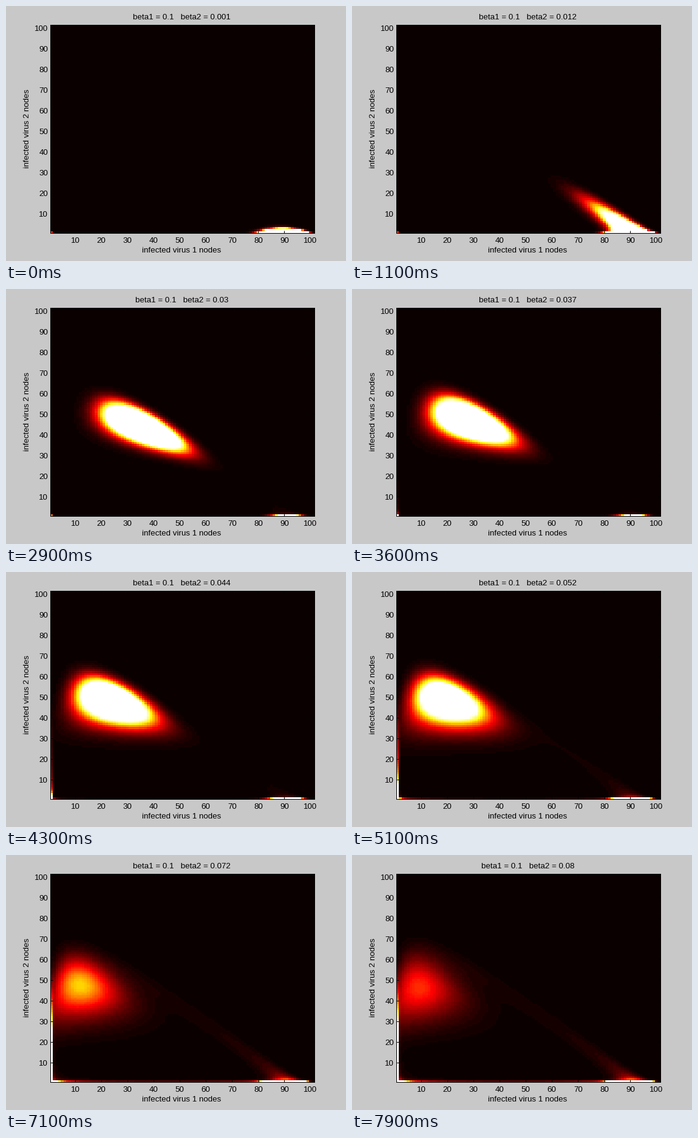
These frames come from a looping animation (560x420 px, 8000 ms). A matplotlib script:

```python
import numpy as np
import matplotlib.pyplot as plt
from matplotlib.animation import FuncAnimation

# Two viruses on N nodes: virus 1 infects healthy nodes, virus 2 only infects
# nodes that carry virus 1. The picture is the state distribution at time T.
W, H = 560, 420
N, TOP = 100, 80              # nodes, highest virus 2 level kept
BETA1, SEED = 0.1, 0.085      # infection rate, rate of spontaneous infection
T, STEPS = 100, 10
PEAK = 0.001                  # density shown as white
FRAMES, INTERVAL = 80, 100
STEP = (1 - 0.5 ** 0.5) * T / STEPS


def factor(beta2):
    """Eliminate the levels of I - STEP * Q from the top down."""
    inv, up = [None] * (TOP + 1), [None] * (TOP + 1)
    for y in range(TOP, -1, -1):
        x = np.arange(N + 1 - y)
        free = x[::-1]
        birth = (BETA1 * x * free + SEED) * (free > 0)
        turn = (beta2 * x * y + SEED) * (x > 0) * (y < TOP)
        m = np.diag(1 + STEP * (birth + x + y + turn))
        m -= np.diag(STEP * birth[:-1], 1) + np.diag(STEP * x[1:], -1)
        up[y] = STEP * turn[1:]
        if y < TOP:
            m[1:, :-1] -= STEP * (y + 1) * up[y][:, None] * inv[y + 1]
        inv[y] = np.linalg.inv(m)
    return inv, up


def solve(rhs, inv, up):
    p = [None] * (TOP + 1)
    for y in range(TOP, -1, -1):
        v = rhs[y, :N + 1 - y].copy()
        if y < TOP:
            v[:-1] += STEP * (y + 1) * p[y + 1]
        p[y] = v @ inv[y]
    out = np.zeros_like(rhs)
    for y in range(TOP + 1):
        if y:
            p[y] = p[y] + (p[y - 1][1:] * up[y - 1]) @ inv[y]
        out[y, :N + 1 - y] = p[y]
    return out


def density(beta2):
    inv, up = factor(beta2)
    p = np.zeros((N + 1, N + 1))
    p[0, 0] = 1
    r = 2 ** 0.5
    for _ in range(STEPS):    # two-stage implicit step
        a = solve(p, inv, up)
        p = (1 + r) * solve(a, inv, up) - r * a
    return np.clip(p, 0, None)


def beta2_at(i):
    return (i + 1) / 1000


def title_at(i):
    return f"beta1 = {BETA1:g}   beta2 = {beta2_at(i):g}"


maps = [density(beta2_at(i)) for i in range(FRAMES)]

plt.rcParams["font.family"] = "Liberation Sans"
plt.rcParams["font.size"] = 9.6
fig = plt.figure(figsize=(W / 100, H / 100), dpi=100, facecolor="#c8c8c8")

LEFT, RIGHT, UPPER, LOWER = 73, 508, 31, 374
ax = fig.add_axes([LEFT / W, 1 - LOWER / H, (RIGHT - LEFT) / W, (LOWER - UPPER) / H])
image = ax.imshow(maps[0], cmap=plt.get_cmap("hot", 64), vmin=0, vmax=PEAK,
                  origin="lower", interpolation="nearest", aspect="auto",
                  extent=(0.5, N + 1.5, 0.5, N + 1.5))
ticks = range(10, 101, 10)
ax.set_xticks(ticks)
ax.set_yticks(ticks)
ax.tick_params(direction="in", length=2.9, width=0.72, top=True, right=True,
               labelbottom=False, labelleft=False)
for spine in ax.spines.values():
    spine.set_linewidth(0.72)


def put(x, y, text, ha="center", **kw):
    return fig.text(x / W, 1 - y / H, text, ha=ha, va="baseline", **kw)


for t in ticks:
    f = (t - 0.5) / (N + 1)
    put(LEFT + f * (RIGHT - LEFT), 390, str(t))
    put(69, LOWER - f * (LOWER - UPPER) + 5.3, str(t), ha="right")
put(289.5, 406, "infected virus 1 nodes")
put(38.5, 202, "infected virus 2 nodes", rotation=90, rotation_mode="anchor")
title = put(289.5, 21.5, title_at(0))


def draw(i):
    image.set_data(maps[i])
    title.set_text(title_at(i))
    return image, title


anim = FuncAnimation(fig, draw, frames=FRAMES, interval=INTERVAL,
                     repeat=True, repeat_delay=0, blit=False)
plt.show()
```
